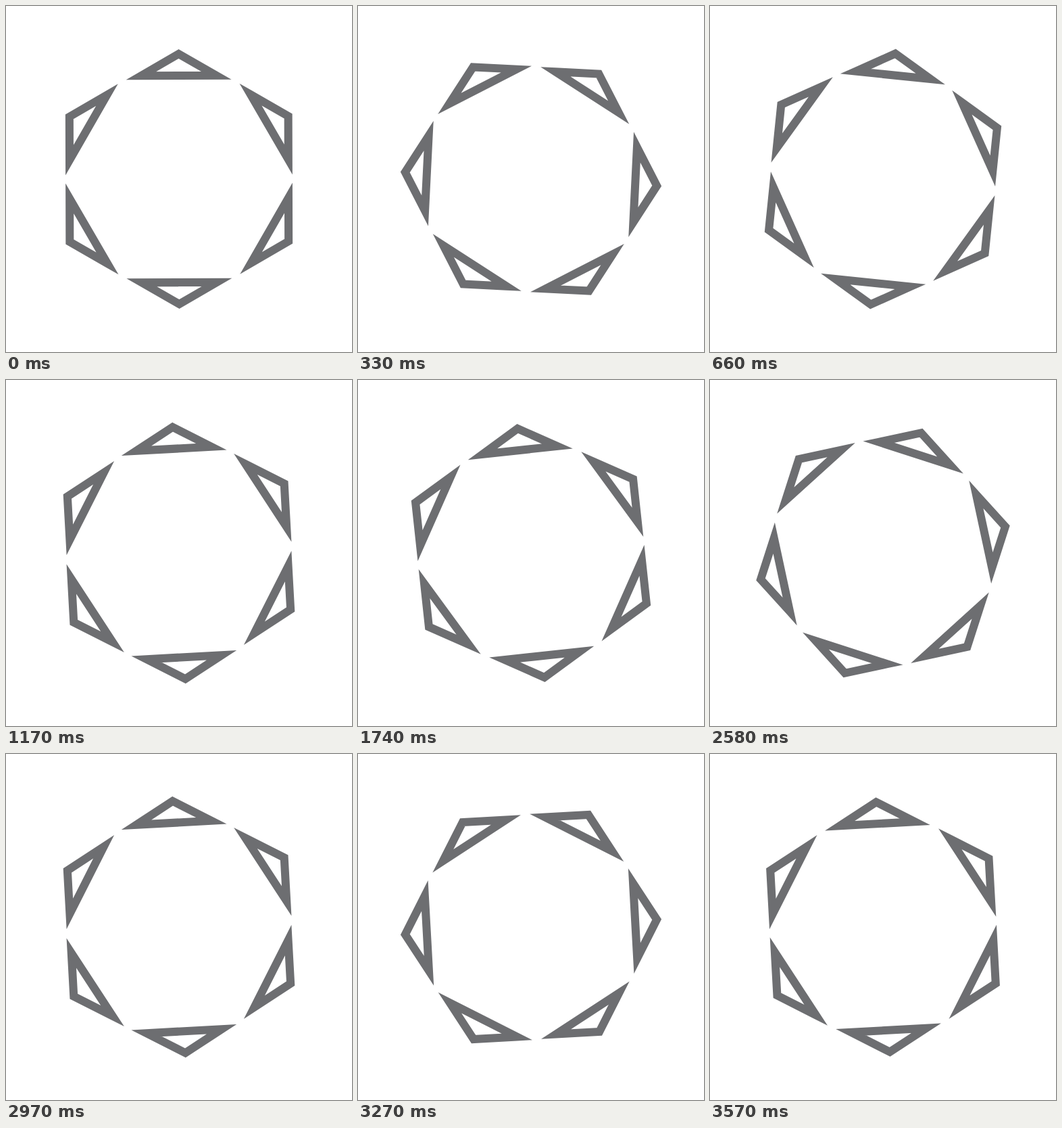
These frames come from a looping animation (512x512 px, 3600 ms). An HTML page:

```html
<!DOCTYPE html>
<html lang="en">
<head>
<meta charset="utf-8">
<title>Rotating triangles</title>
<style>
  html, body { margin: 0; width: 100%; height: 100%; overflow: hidden; background: #fff; }
  svg { display: block; width: 100%; height: 100%; }
</style>
</head>
<body>
<svg viewBox="0 0 512 512">
  <g id="ring" fill="none" stroke="#6d6e71" stroke-width="12" stroke-miterlimit="10"></g>
</svg>
<script>
  const CENTER = 256, LOOP = 3600, STEP = 30, TILT = -0.15;
  const SIDE_SHIFT = 1.6; // side triangles sit slightly further out
  const ring = document.getElementById('ring');

  for (let i = 0; i < 6; i++) {
    const side = Math.sign(Math.round(Math.sin(i * Math.PI / 3) * 100));
    const path = document.createElementNS('http://www.w3.org/2000/svg', 'path');
    path.setAttribute('d', 'M-55.6 -153L0 -185.1L55.6 -153Z');
    path.setAttribute('transform', `translate(${side * SIDE_SHIFT} 0) rotate(${i * 60})`);
    ring.append(path);
  }

  function render(ms) {
    const t = Math.floor((ms % LOOP) / STEP) * STEP;
    const angle = t / LOOP * 360 + TILT;
    ring.setAttribute('transform', `translate(${CENTER} ${CENTER}) rotate(${angle})`);
  }

  let start;
  function tick() {
    const now = performance.now();
    start ??= now;
    render(now - start);
    requestAnimationFrame(tick);
  }
  render(0);
  requestAnimationFrame(tick);
</script>
</body>
</html>
```
